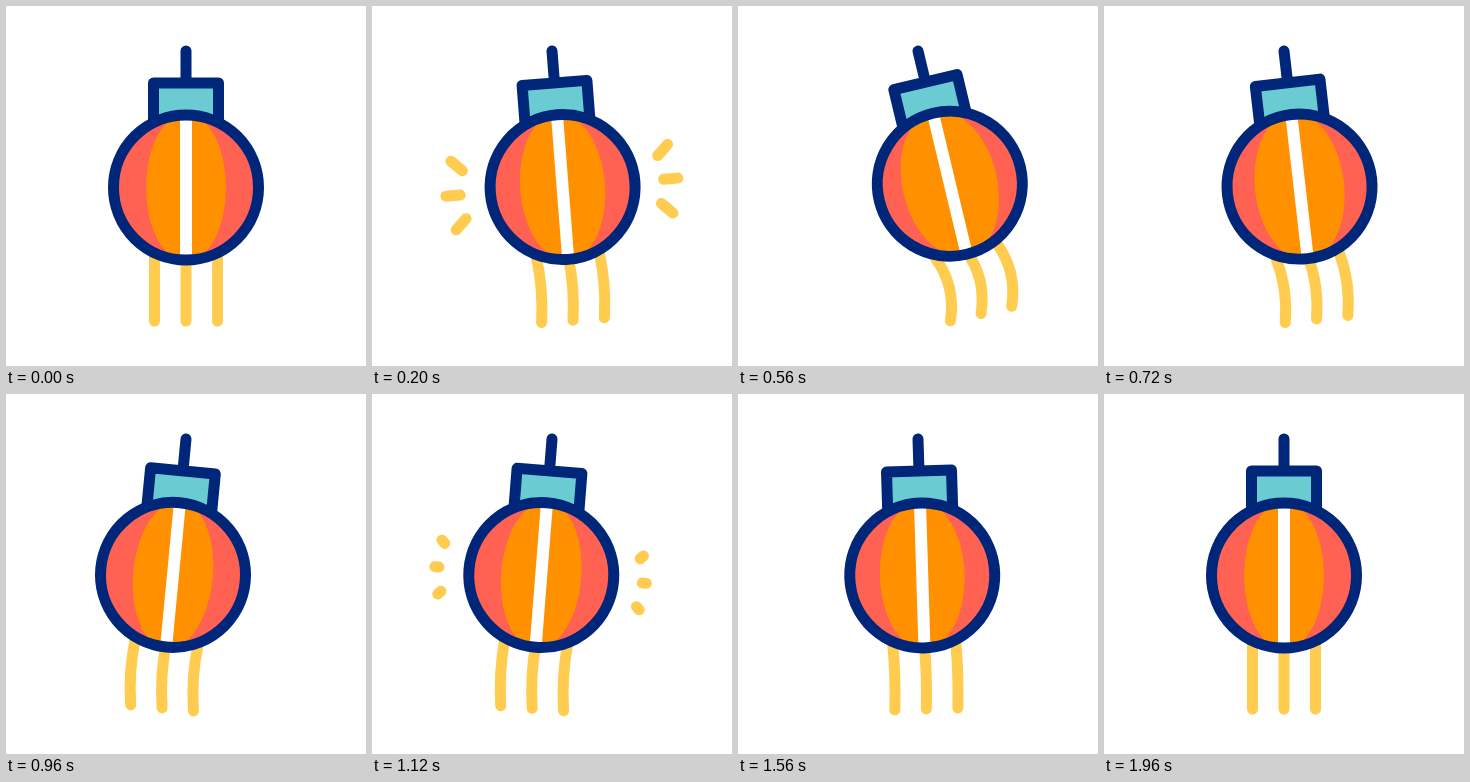
Recreate the animation shown at these times as an HTML page. Size 360 by 360 pixels, loop 2 s.

```html
<!DOCTYPE html>
<html lang="en">
<head>
<meta charset="utf-8">
<title>Swinging lantern</title>
<style>
  html, body { margin: 0; width: 100%; height: 100%; overflow: hidden; background: #fff; }
  svg { display: block; width: 100vw; height: 100vh; }
  .line { fill: none; stroke-width: 11; stroke-linecap: round; stroke-linejoin: round; }
  .navy { stroke: #00267a; }
  .gold { stroke: #ffcc50; }
</style>
</head>
<body>
<svg viewBox="0 0 360 360">
  <defs>
    <clipPath id="globe"><circle cx="180" cy="181.5" r="70"/></clipPath>
  </defs>
  <g id="lantern">
    <g id="tassels" class="line gold"></g>
    <path d="M147.5 77H212.5V125H147.5Z" fill="#6acbd2"/>
    <path class="line navy" d="M180 45V77M147.5 118V77H212.5V118"/>
    <g clip-path="url(#globe)">
      <circle cx="180" cy="181.5" r="72" fill="#ff6152"/>
      <ellipse id="panel" cx="180" cy="181.5" rx="40" ry="74" fill="#ff9100"/>
      <rect x="174" y="108" width="12" height="147" fill="#fff"/>
    </g>
    <circle class="line navy" cx="180" cy="181.5" r="72.5"/>
    <g id="sparks" class="line gold" transform="translate(179.3 181.5)"></g>
  </g>
</svg>
<script>
const LOOP = 2000, STEP = 40;
const byId = id => document.getElementById(id);
const lantern = byId('lantern'), panel = byId('panel');

// Keys are [time, value] pairs, eased in and out between neighbours.
const SWING = [[0, 0], [520, 13.8], [1000, -5.8], [1450, 2], [1960, 0]];
const PANEL_WIDTH = [[0, 40], [520, 47.5], [1000, 39.7], [1480, 42.5], [1960, 40]];
const TASSEL_LAG = [[0, 0], [520, 0], [720, 1.8], [960, 1.8], [1450, 0]];
const BURSTS = [60, 1080];

function addPath(parent) {
  const path = document.createElementNS('http://www.w3.org/2000/svg', 'path');
  parent.appendChild(path);
  return path;
}

const tassels = [148.5, 180, 211.5].map(x => ({ x, path: addPath(byId('tassels')) }));
const sparks = [-1, 1].flatMap(side => [-1, 0, 1].map(row => ({
  from: row ? [side * 98, row * 24] : [side * 102, 0],
  to: row ? [side * 115.5, row * 41] : [side * 125.5, 0],
  path: addPath(byId('sparks'))
})));

const clamp = v => Math.max(0, Math.min(1, v));
const mix = (a, b, k) => a + (b - a) * k;

function valueAt(keys, t) {
  const next = keys.findIndex(key => key[0] > t);
  if (next < 0) return keys[keys.length - 1][1];
  const [t0, a] = keys[next - 1], [t1, b] = keys[next];
  return mix(a, b, 0.5 - 0.5 * Math.cos(Math.PI * (t - t0) / (t1 - t0)));
}

function drawSparks(t) {
  const age = t - (t < BURSTS[1] ? BURSTS[0] : BURSTS[1]);
  const head = clamp(age / 230), tail = clamp((age - 140) / 285);
  for (const { from, to, path } of sparks) {
    const point = k => from.map((v, i) => mix(v, to[i], k)).join(' ');
    path.setAttribute('d', head - tail > 0.02 ? `M${point(tail)}L${point(head)}` : '');
  }
}

function draw(t) {
  const angle = valueAt(SWING, t), lag = valueAt(TASSEL_LAG, t);
  lantern.setAttribute('transform', `rotate(${-angle} 180 45)`);
  panel.setAttribute('rx', valueAt(PANEL_WIDTH, t));
  for (const { x, path } of tassels) {
    path.setAttribute('d', `M${x} 250Q${x + angle + lag} 282 ${x + lag} 315`);
  }
  drawSparks(t);
}

const start = performance.now();
function tick() {
  const t = (performance.now() - start) % LOOP;
  draw(Math.floor(t / STEP) * STEP);
  requestAnimationFrame(tick);
}
tick();
</script>
</body>
</html>
```
